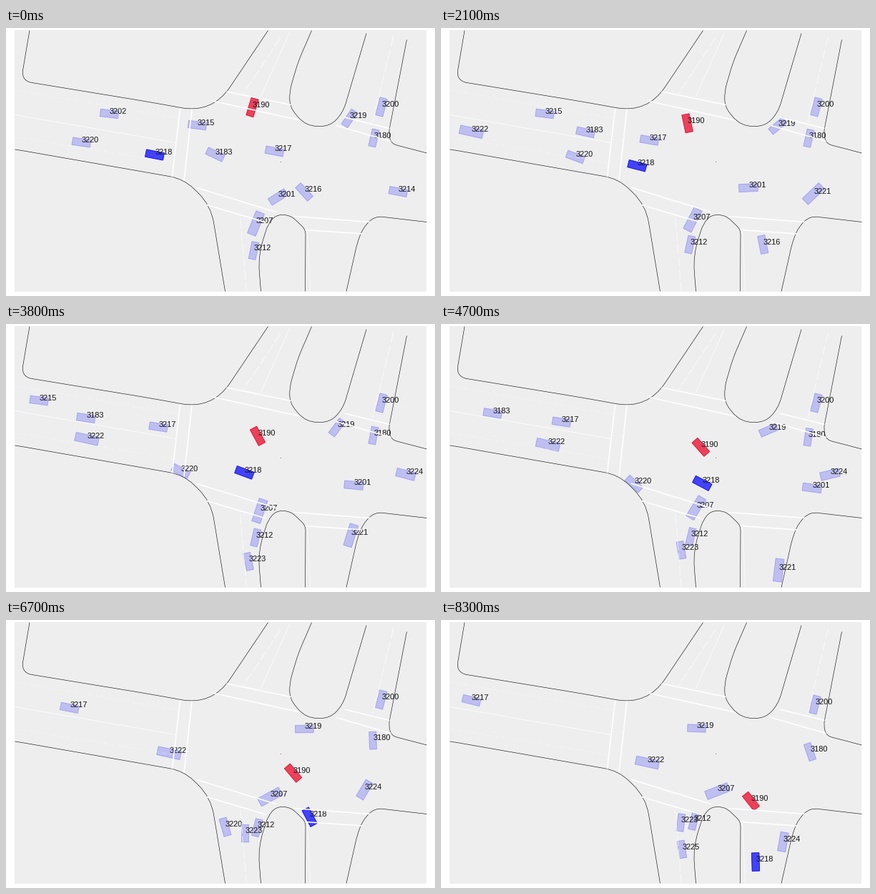
Write a matplotlib script that moves like this. It is 600 by 375 pixels and loops after 8400 ms.

```python
import numpy as np
import matplotlib.pyplot as plt
from matplotlib.animation import FuncAnimation
from matplotlib.patches import PathPatch, Polygon, Rectangle
from matplotlib.path import Path

DPI = 100
PX = 72 / DPI
FRAMES = 84
STEP = 100
LAST = FRAMES - 1

fig = plt.figure(figsize=(6, 3.75), dpi=DPI, facecolor="white")
ax = fig.add_axes([0, 0, 1, 1])
ax.set_xlim(-0.5, 599.5)
ax.set_ylim(374.5, -0.5)
ax.axis("off")

ground = Rectangle((11.5, 2.5), 576, 366, fc="#eeeeee", ec="none", zorder=0)
ax.add_patch(ground)


def kerb(start, *corners, end):
    """A polyline whose corners (x, y, cut) are rounded off."""
    pts = np.array([start, *(c[:2] for c in corners), end], float)
    verts, codes = [pts[0]], [Path.MOVETO]
    for a, b, c, (_, _, cut) in zip(pts, pts[1:], pts[2:], corners):
        before, after = np.linalg.norm(a - b), np.linalg.norm(c - b)
        cut = min(cut, before / 2, after / 2)
        verts += [b + (a - b) * cut / before, b, b + (c - b) * cut / after]
        codes += [Path.LINETO, Path.CURVE3, Path.CURVE3]
    path = Path(verts + [pts[-1]], codes + [Path.LINETO])
    ax.add_patch(PathPatch(path, fc="none", ec="#1c1c1c", lw=0.65 * PX, zorder=1))


def paint(start, end, width=1.6, alpha=1.0, dash=None):
    style = (0, dash) if dash else "-"
    ax.plot(*zip(start, end), color="white", lw=width * PX, alpha=alpha,
            ls=style, solid_capstyle="butt", zorder=5)


kerb((32.5, 3), (20.5, 73.5, 16), (200, 103, 30), (288, 119, 52), end=(366, 3))
kerb((427, 3), (408, 47, 12), (396, 88, 15), (396.5, 110, 30), (418.5, 137, 40),
     (453, 137, 40), (471, 117.5, 30), end=(503.5, 7))
kerb((560, 16), (534.5, 147, 10), (538.5, 161.5, 14), end=(588, 174.5))
kerb((12, 169.5), (22, 171, 4), (248, 210.6, 20), (286, 247.5, 25), end=(306, 368))
kerb((356, 368), (352, 318, 25), (366, 274, 20), (377, 261, 12), (397, 261, 20),
     (418.5, 281.5, 7), end=(418, 368))
kerb((475.5, 368), (491, 299, 15), (499, 279, 12), (515, 262.5, 18), end=(588, 271))

# Crossings
paint((243, 112), (232, 208))
paint((259.5, 113), (248.5, 213))
paint((308, 88.5), (398, 107))
paint((288, 101.5), (411, 128.5))
paint((473, 124.5), (536, 140))
paint((461, 136), (538, 158))
paint((265, 222.5), (377, 257))
paint((280, 247), (363, 271.5))
paint((402, 263), (509, 271))
paint((418, 282), (498, 287.5))

# Lane lines
DASH = (14, 4)
paint((12, 121), (237, 160), 1, 0.8)
paint((12, 86), (240, 126), 0.8, 0.4, (8, 5))
paint((12, 152), (234, 188), 0.8, 0.4, (8, 5))
paint((396, 6), (356, 95), 1, 0.7)
paint((383, 14), (331, 92), 1, 0.7, DASH)
paint((541, 12), (512, 132), 1, 0.7, DASH)
paint((327, 266), (336, 368), 1, 0.7, DASH)
paint((421, 284), (425, 368), 1, 0.7)
ax.plot([383], [186.5], ".", color="#555555", ms=1.3, mew=0, zorder=1)

PALE = ((0.0, 0.0, 1.0, 0.2), (0.25, 0.25, 0.9, 0.33))
BLUE = ((0.0, 0.0, 1.0, 0.72), (0.0, 0.0, 0.85, 0.9))
RED = ((0.93, 0.0, 0.15, 0.73), (0.85, 0.0, 0.1, 0.85))


def along(pts, u):
    """Point and heading at u in 0..1 on a spline through evenly timed points."""
    slopes = np.gradient(pts, axis=0, edge_order=min(2, len(pts) - 1))
    k = min(int(u * (len(pts) - 1)), len(pts) - 2)
    s = u * (len(pts) - 1) - k
    p, q, m, n = pts[k], pts[k + 1], slopes[k], slopes[k + 1]
    c2, c3 = 3 * (q - p) - 2 * m - n, 2 * (p - q) + m + n
    dx, dy = m + s * (2 * c2 + s * 3 * c3)
    return p + s * (m + s * (c2 + s * c3)), np.arctan2(dy, dx)


class Car:
    def __init__(self, name, first, last, *pts, size=(25.5, 10.5), look=PALE, ease=1):
        self.first, self.last, self.ease = first, last, ease
        self.pts = np.array(pts, float)
        box = np.array([(-1, -1), (1, -1), (1, 1), (-1, 1)])
        self.corners = box * np.array(size) / 2
        self.body = Polygon(self.corners, fc=look[0], ec=look[1], lw=0.9 * PX, zorder=2)
        ax.add_patch(self.body)
        self.body.set_clip_path(ground)
        self.label = ax.text(0, 0, name, family="Liberation Sans",
                             fontsize=11 * PX, color="#111111", zorder=3)

    def show(self, step):
        seen = self.first <= step <= self.last
        self.body.set_visible(seen)
        self.label.set_visible(seen)
        if seen:
            u = ((step - self.first) / (self.last - self.first)) ** self.ease
            spot, a = along(self.pts, u)
            turn = np.array([[np.cos(a), np.sin(a)], [-np.sin(a), np.cos(a)]])
            self.body.set_xy(self.corners @ turn + spot)
            self.label.set_position(spot + (0.4, -0.4))


cars = [
    # Westbound
    Car("3202", 0, 18, (144, 119.5), (41, 107)),
    Car("3215", 0, 40, (267, 135.5), (34, 105)),
    Car("3183", 0, 59, (292, 176.5), (208, 147), (105, 130), (27, 117)),
    Car("3217", 0, LAST, (375, 172), (262, 151.5), (131, 130.5), (42, 112)),
    # Eastbound
    Car("3220", 0, 80, (105, 159.5), (207, 188), (284, 240), (316, 350)),
    Car("3222", 17, LAST, (25, 141), (161, 171), (288, 199), size=(33, 12)),
    Car("3201", 0, 57, (380, 236), (410.5, 225), (453, 223), (503, 227),
        (555.5, 235), size=(26.5, 11)),
    Car("3214", 0, 3, (548, 228.5), (561, 231)),
    # From the north
    Car("3200", 0, LAST, (524.5, 110), (522.5, 118), ease=10),
    Car("3180", 0, LAST, (514, 153.5), (512.6, 169), (515.5, 184),
        size=(24.5, 10), ease=3.5),
    Car("3219", 0, LAST, (480, 126), (466.5, 139.5), (446, 150.5), (357, 151)),
    # To the south
    Car("3221", 6, 48, (561, 211.5), (523, 229), (488.5, 277), (471, 350),
        size=(32, 12)),
    Car("3224", 35, LAST, (563, 211.5), (536, 212.5), (501, 237), (478, 310),
        size=(27, 11.5)),
    Car("3216", 0, 32, (416.5, 229), (438, 262), (450, 304), (456, 354)),
    # From the south
    Car("3207", 0, LAST, (349, 273), (352.7, 265.5), (360, 252.5), (386, 239),
        size=(33.5, 12.5)),
    Car("3212", 0, LAST, (346, 311), (348.2, 300.5), (349.5, 295), (353, 281),
        size=(24.5, 10)),
    Car("3223", 29, LAST, (343, 353), (335.5, 316), (334, 300), (335, 283),
        size=(24.5, 10)),
    Car("3225", 75, LAST, (341, 352), (336.5, 320.5), size=(24.5, 10)),
    # The pair in focus
    Car("3218", 0, LAST, (207.5, 177), (273, 192), (345, 212.5), (414.5, 260),
        (439.5, 338), look=BLUE),
    Car("3190", 0, LAST, (344, 110.5), (344, 132.5), (355, 162), (392, 203),
        (433, 253), look=RED),
]


def draw(step):
    for car in cars:
        car.show(step)
    return []


anim = FuncAnimation(fig, draw, frames=FRAMES, interval=STEP,
                     init_func=lambda: draw(0), repeat=True, repeat_delay=0)
plt.show()
```
